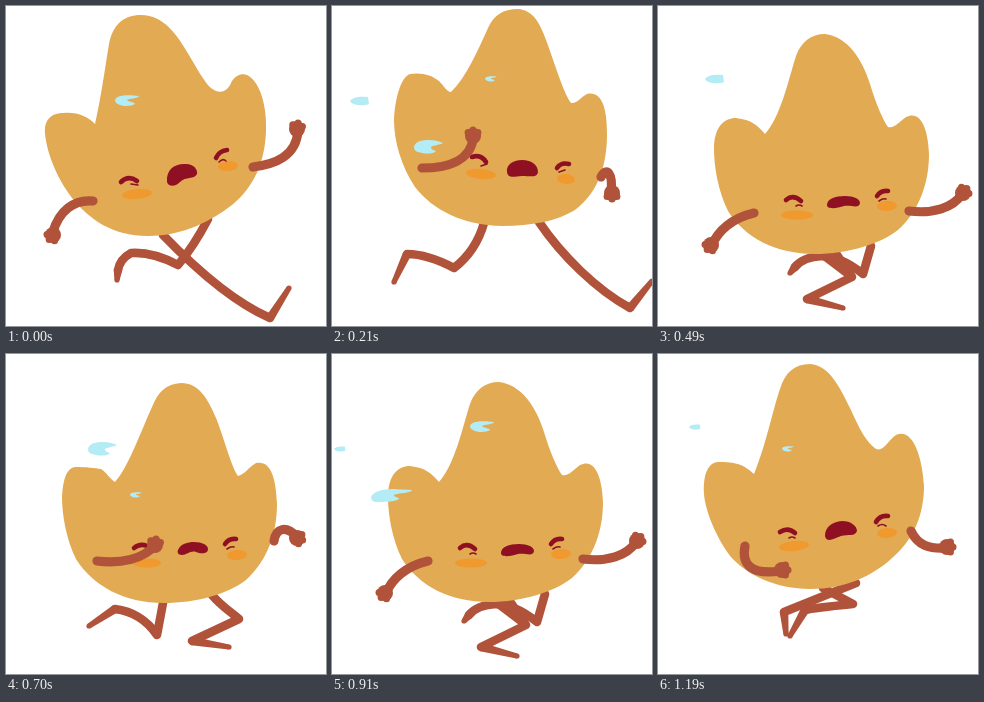
An HTML page that plays this animation: 320 by 320 pixels, repeating every 1.26 s.

```html
<!DOCTYPE html>
<html lang="en">
<head>
<meta charset="utf-8">
<title>Running flame</title>
<style>
  html, body { margin: 0; width: 100%; height: 100%; overflow: hidden; background: #fff; }
  svg { display: block; width: 100vw; height: 100vh; }
</style>
</head>
<body>
<svg id="stage" viewBox="0 0 320 320"></svg>
<script>
const STEP = 70, STEPS = 18;
const SKIN = '#e2aa53', LIMB = '#b0533a', DARK = '#8e1022', CHEEK = '#f0992e', WATER = '#b4ecf6';

// legs: [path to ankle, ankle x, y, toe x, y]; arms: [path, hand x, y, finger angle]
// cheeks: [x, y, rx, ry, tilt]
const poses = [
  {
    body: 'M89 118C95 92 99 62 103 38C107 18 118 9 135 9C158 9 171 29 183 49C190 61 199 77 205 82C212 88 221 87 225 77C229 69 236 67 241 69C255 76 261 102 260 125C259 156 248 181 226 199C206 214 178 230 142 230C106 230 83 213 66 192C49 170 40 143 39 127C38 112 47 107 58 107C72 106 82 111 89 118Z',
    legs: [['M157 229C185 258 225 295 264 312', 264, 312, 283, 282],
           ['M202 213Q188 240 172 259C155 250 140 246 125 247Q114 253 112 264', 112, 264, 111, 274]],
    arms: [['M87 195C68 193 53 205 47 226', 47, 229, 130], ['M247 161C270 158 290 150 292 125', 291, 123, -80]],
    eyes: ['M115 176Q122 169 131 175', 'M210 152Q213 145 221 144'],
    lids: 'M125 178L132 179M213 156Q217 152 220 155',
    cheeks: [[131, 188, 15, 5, -6], [222, 160, 10, 5, -4]],
    mouth: 'M161 176C160 164 168 158 178 158C187 157 192 163 191 168C188 174 180 170 174 176C168 182 162 180 161 176Z'
  },
  {
    body: 'M107 128C123 110 130 75 138 50C143 36 153 28 167 28C190 31 204 53 212 78C218 98 225 114 230 121C236 123 241 116 248 111C262 104 270 121 271 148C271 176 262 204 240 224C222 238 190 248 157 248C118 248 87 232 70 205C60 185 56 160 56 143C56 121 66 112 78 112C94 114 99 119 107 128Z',
    legs: [['M164 248L193 270L179 249L194 271L149 293', 149, 293, 185, 302],
           ['M213 240L205 268C195 260 180 250 164 250Q145 251 137 261', 137, 261, 132, 267]],
    arms: [['M96 207C74 212 60 225 54 239', 53, 239, 130], ['M251 205C275 208 295 202 304 188', 305, 187, -50]],
    eyes: ['M128 194Q135 188 143 195', 'M219 190Q223 184 230 185'],
    lids: 'M138 200Q141 198 144 200M221 195Q225 192 228 193',
    cheeks: [[139, 209, 16, 4.5, 0], [229, 200, 10, 5, -4]],
    mouth: 'M169 199C169 193 177 190 187 190C196 190 202 193 202 197C201 203 194 199 186 200C180 202 169 204 169 199Z'
  },
  {
    body: 'M116 93C132 77 142 53 153 29C159 16 168 10 183 10C198 11 205 24 211 41C219 62 228 93 236 104C242 105 246 98 252 95C266 92 272 107 272 135C272 165 264 193 240 211C222 222 197 227 167 227C127 226 98 211 80 188C66 167 59 142 59 121C60 99 66 78 75 75C86 73 97 76 104 82C109 87 112 93 116 93Z',
    legs: [['M155 225L156 259L114 260', 114, 260, 101, 285],
           ['M205 222C213 240 225 253 238 263L204 287', 204, 287, 231, 300]],
    arms: [['M88 181C83 201 96 211 118 205', 120, 204, 0], ['M262 181C269 192 278 194 287 188', 288, 187, 0]],
    eyes: ['M134 164Q142 158 150 164', 'M223 168Q227 162 235 163'],
    lids: 'M145 169Q148 167 151 169M226 173Q230 170 233 171',
    cheeks: [[144, 178, 15, 5, 3], [232, 180, 9.5, 5, 0]],
    mouth: 'M172 173C171 165 179 161 187 161C197 161 203 166 203 172C202 178 196 176 187 176C177 178 173 178 172 173Z'
  },
  {
    body: 'M119 86C135 70 145 46 156 22C162 9 171 3 186 3C201 4 208 17 214 34C222 55 231 86 239 97C245 98 249 91 255 88C269 85 275 100 275 128C275 158 267 186 243 204C225 215 200 220 170 220C130 219 101 204 83 181C69 160 62 135 62 114C63 92 69 71 78 68C89 66 100 69 107 75C112 80 115 86 119 86Z',
    legs: [['M152 217C146 238 135 252 122 262C105 253 90 248 75 248', 75, 248, 62, 276],
           ['M207 216C230 250 265 284 298 302', 298, 302, 320, 275]],
    arms: [['M90 162C115 162 138 155 141 133', 141, 130, -90], ['M269 171C275 160 281 168 279 186', 280, 187, 90]],
    eyes: ['M140 151Q149 148 154 156', 'M225 162Q229 156 237 158'],
    lids: 'M149 160L155 158M227 166L233 164',
    cheeks: [[149, 168, 15, 5, 6], [234, 173, 9, 5, 4]],
    mouth: 'M175 166C174 158 182 154 190 154C200 154 206 159 206 166C205 172 199 170 190 170C180 171 176 172 175 166Z'
  },
  {
    body: 'M109 128C122 114 135 77 146 53C152 38 160 30 175 29C193 29 202 45 210 64C218 84 225 112 232 122C238 121 243 113 250 109C264 106 270 122 271 150C271 177 263 205 240 226C222 240 190 249 158 249C118 249 87 232 70 205C60 185 56 160 56 143C57 124 61 114 69 113C80 113 89 114 95 115C101 119 104 125 109 128Z',
    legs: [['M157 249L151 281C140 265 125 257 109 255', 109, 255, 83, 272],
           ['M206 241C215 252 225 258 233 265L186 287', 186, 287, 223, 293]],
    arms: [['M91 207C115 210 138 205 149 191', 149, 191, -80], ['M268 187C270 174 280 171 291 183', 291, 184, 20]],
    eyes: ['M128 194Q134 189 141 192', 'M219 190Q223 184 230 185'],
    lids: 'M221 195Q225 192 228 193',
    cheeks: [[141, 209, 14, 4.5, 0], [231, 201, 10, 5, -4]],
    mouth: 'M172 196C174 190 182 188 188 188C196 188 202 191 202 195C202 200 195 200 190 198C185 196 181 201 176 201C172 201 171 198 172 196Z'
  },
  {
    body: 'M96 120C108 91 115 55 122 35C127 18 137 10 152 10C172 11 183 36 192 54C201 74 208 88 218 95C226 98 230 86 238 81C254 74 264 100 266 132C266 160 256 186 233 205C214 222 187 235 152 235C118 235 89 221 73 203C57 182 47 155 46 140C45 120 50 109 60 108C78 108 85 110 96 120Z',
    legs: [['M198 229L126 258', 126, 258, 128, 280],
           ['M165 234L195 250C175 252 155 254 147 256', 147, 256, 132, 282]],
    arms: [['M87 192C83 212 95 221 122 217', 124, 216, 0], ['M253 177C260 192 272 195 288 194', 289, 193, 0]],
    eyes: ['M122 178Q130 173 137 179', 'M218 168Q222 161 230 162'],
    lids: 'M131 184Q134 182 137 184M220 172Q224 169 228 172',
    cheeks: [[136, 192, 15, 5, -6], [229, 179, 10, 5, -4]],
    mouth: 'M167 182C167 173 174 168 184 167C193 167 199 172 199 177C197 183 190 180 183 182C176 185 168 189 167 182Z'
  }
];

// Sweat: one six-step life, shared by three drops.
const splash = 'M0 0C0 -5 8 -7 24 -5C23 -2 14 -3 12 -1C13 1 20 1 20 3C16 6 2 6 0 0Z';
const bead = 'M0 0C2 -4 10 -5 18 -4L19 3C15 5 2 5 0 0Z';
const life = [
  [124, 0.48, splash],
  [109, 1, splash],
  [82, 1, 'M0 0C1 -6 8 -7 15 -7C20 -7 25 -6 29 -4C26 -2 20 -2 17 0C17 3 20 3 22 4C20 7 12 7 8 6C3 5 0 4 0 0Z'],
  [39, 1, 'M0 2C2 -3 10 -6 22 -6L41 -5C41 -2 27 -2 23 0C22 2 28 2 28 4C24 7 12 7 6 7C2 7 0 5 0 2Z'],
  [18, 1, bead],
  [2, 0.6, bead]
];
const drops = [{ born: 8, dx: 0, y: 95 }, { born: 1, dx: 0, y: 141 }, { born: 3, dx: 29, y: 73 }];

const fill = (d, color) => `<path d="${d}" fill="${color}"/>`;
const line = (d, color, width) =>
  `<path d="${d}" fill="none" stroke="${color}" stroke-width="${width}" stroke-linecap="round" stroke-linejoin="round"/>`;
const dot = (x, y, r) => `<circle cx="${x}" cy="${y}" r="${r}" fill="${LIMB}"/>`;

function leg([d, ax, ay, tx, ty]) {
  const len = Math.hypot(tx - ax, ty - ay);
  const nx = (ay - ty) / len, ny = (tx - ax) / len;
  const edge = (x, y, w) => `${x + nx * w} ${y + ny * w}`;
  const foot = `M${edge(ax, ay, 4.3)}L${edge(tx, ty, 2.6)}L${edge(tx, ty, -2.6)}L${edge(ax, ay, -4.3)}Z`;
  return line(d, LIMB, 8.6) + fill(foot, LIMB) + dot(tx, ty, 2.6);
}

function arm([d, x, y, angle]) {
  const fingers = [-55, 0, 55].map(spread => {
    const a = (angle + spread) * Math.PI / 180;
    return dot(x + 6 * Math.cos(a), y + 6 * Math.sin(a), 3.5);
  });
  return line(d, LIMB, 9.2) + dot(x, y, 8) + fingers.join('');
}

const cheek = ([x, y, rx, ry, tilt]) =>
  `<ellipse rx="${rx}" ry="${ry}" fill="${CHEEK}" transform="translate(${x} ${y}) rotate(${tilt})"/>`;

function sweat({ born, dx, y }, step) {
  const age = (step - born + STEPS) % 9;
  if (age >= life.length) return '';
  const [x, size, d] = life[age];
  return `<path d="${d}" fill="${WATER}" transform="translate(${x + dx} ${y}) scale(${size})"/>`;
}

function picture(step) {
  const p = poses[step % poses.length];
  return [
    ...p.legs.map(leg),
    fill(p.body, SKIN),
    ...p.cheeks.map(cheek),
    ...p.eyes.map(d => line(d, DARK, 4.6)),
    line(p.lids, DARK, 1.6),
    fill(p.mouth, DARK),
    ...drops.map(drop => sweat(drop, step)),
    ...p.arms.map(arm)
  ].join('');
}

const stage = document.getElementById('stage');
let shown = -1;

function tick() {
  const step = Math.floor(performance.now() / STEP) % STEPS;
  if (step !== shown) {
    stage.innerHTML = picture(step);
    shown = step;
  }
  requestAnimationFrame(tick);
}
tick();
</script>
</body>
</html>
```
